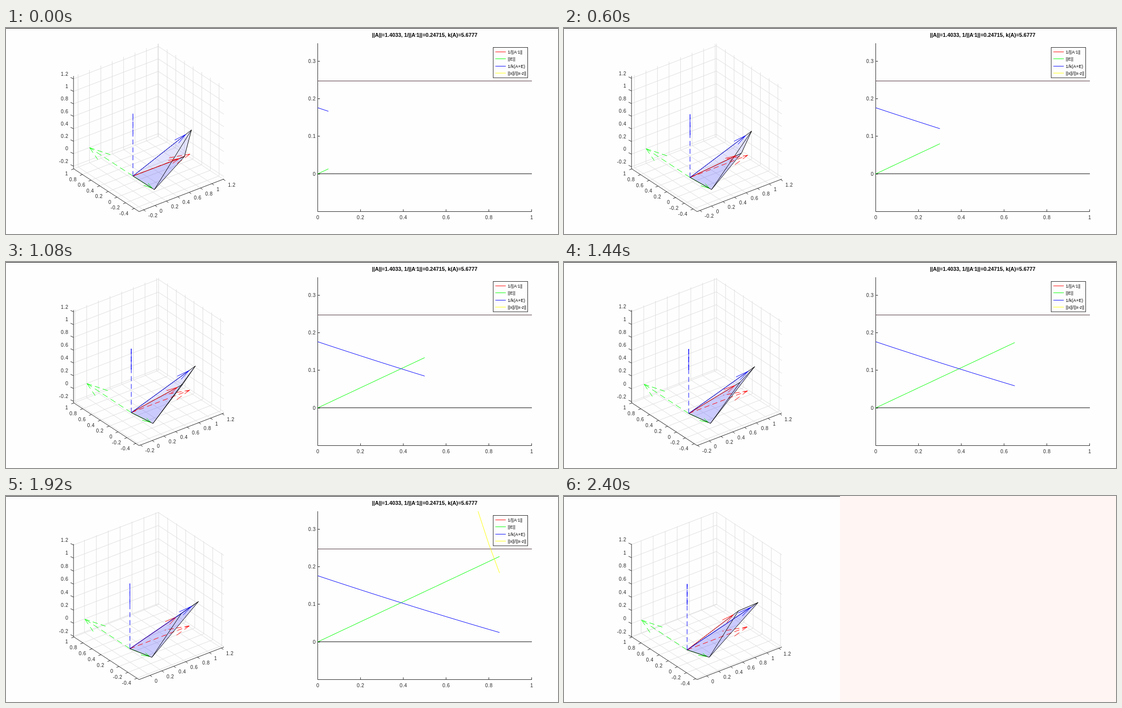
Write an HTML page that moves like this. It is 1120x418 px and loops after 2520 ms.

```html
<!DOCTYPE html>
<html lang="en">
<head>
<meta charset="utf-8">
<title>Matrix perturbation</title>
<style>
html, body { margin: 0; width: 100%; height: 100%; overflow: hidden; background: #fefefe; }
svg { display: block; width: 1120px; height: 418px; }
text { font-family: "Liberation Sans", Arial, sans-serif; fill: #262626; }
.tick text { font-size: 10px; letter-spacing: .45px; }
.key text { font-size: 9px; fill: #000; }
.title { font-size: 10.8px; font-weight: bold; fill: #000; }
path, line { fill: none; stroke-width: 1; }
</style>
</head>
<body>
<svg viewBox="0 0 1120 418">
  <defs><clipPath id="plot"><rect x="632" y="31" width="435" height="341"/></clipPath></defs>
  <rect width="1120" height="418" fill="#fefefe"/>
  <g id="space"></g>
  <g id="chart">
    <g id="axes" class="tick"></g>
    <g id="curves" clip-path="url(#plot)"></g>
    <g id="key" class="key"></g>
    <text class="title" x="849.5" y="18" text-anchor="middle">||A||=1.4033, 1/||A<tspan dy="-4" font-size="7">-</tspan><tspan dy="4">1||=0.24715, k(A)=5.6777</tspan></text>
  </g>
  <rect id="blank" x="560" width="560" height="418" fill="#fff5f3"/>
  <rect id="rule" width="1120" height="1" fill="#000"/>
</svg>
<script>
const STEP = 120, COUNT = 21;
const INK = '#262626', GRID = '#dedede';
const RED = '#f00', GREEN = '#0f0', BLUE = '#00f', YELLOW = '#ff0';
const $ = id => document.getElementById(id);
const n = v => +v.toFixed(2);
const mix = (a, b, u) => a + (b - a) * u;
const add = (p, q, s = 1) => [p[0] + q[0] * s, p[1] + q[1] * s];
const sub = (p, q) => add(p, q, -1);

const poly = pts => 'M' + pts.map(p => n(p[0]) + ' ' + n(p[1])).join('L');
const stroke = (pts, color, extra = '') => `<path d="${poly(pts)}" stroke="${color}" ${extra}/>`;
const label = (x, y, s, anchor) =>
  `<text x="${n(x)}" y="${n(y + 3.6)}" text-anchor="${anchor}">${s}</text>`;

// Dash lengths are counted along the longer screen axis
function dashed(a, b, color) {
  const d = sub(b, a);
  const k = Math.hypot(...d) / Math.max(Math.abs(d[0]), Math.abs(d[1]), 1);
  return stroke([a, b], color, `stroke-dasharray="${n(10 * k)} ${n(6 * k)}"`);
}

function ticks(lo, hi) {
  const out = [];
  for (let i = Math.ceil(lo * 5 - 1e-6); i <= hi * 5 + 1e-6; i++) out.push(i / 5);
  return out;
}

// Box of the 3D axes: front corner and its three edges
const FRONT = [270, 372.5], EDGES = [[172, -66], [-133, -87], [0, -188]];
// Lower limit and span of x, y, z at the first and last step
const LIMITS = [
  [[-.28, 1.489], [-.16, 1.41]],
  [[-.51, 1.515], [-.43, 1.44]],
  [[-.241, 1.487], [-.2001, 1.407]]
];
// Column tips on screen at the first and last step
const TIPS = {
  r: [[362, 261], [354, 233]],
  g: [[301, 328], [294.8, 327.2]],
  b: [[376.3, 206.8], [394, 216]]
};

function drawSpace(u) {
  const lim = LIMITS.map(([a, b]) => {
    const lo = mix(a[0], b[0], u);
    return [lo, lo + mix(a[1], b[1], u)];
  });
  const unit = EDGES.map((e, i) => e.map(c => c / (lim[i][1] - lim[i][0])));
  const at = (...c) => c.reduce((p, v, i) => add(p, unit[i], v - lim[i][0]), FRONT);
  const [[x0, x1], [y0, y1], [z0, z1]] = lim;
  let grid = '', marks = '', names = '';

  for (const x of ticks(x0, x1)) {
    grid += stroke([at(x, y0, z0), at(x, y1, z0), at(x, y1, z1)], GRID);
    const p = at(x, y0, z0);
    marks += stroke([p, add(p, [4, 3])], INK);
    names += label(p[0] + 9.5, p[1] + 11.3, x, 'start');
  }
  for (const y of ticks(y0, y1)) {
    grid += stroke([at(x0, y, z0), at(x1, y, z0), at(x1, y, z1)], GRID);
    const p = at(x0, y, z0);
    marks += stroke([p, add(p, [-5, 2])], INK);
    names += label(p[0] - 11.5, p[1] + 9.8, y, 'end');
  }
  for (const z of ticks(z0, z1)) {
    grid += stroke([at(x0, y1, z), at(x1, y1, z), at(x1, y0, z)], GRID);
    const p = at(x0, y1, z);
    marks += stroke([p, add(p, [-6, -3])], INK);
    names += label(126.5, p[1] - 10.2, z, 'end');
  }
  const frame = stroke([at(x0, y1, z1), at(x0, y1, z0), at(x0, y0, z0), at(x1, y0, z0)], INK);

  const o = at(0, 0, 0);
  const tip = k => [0, 1].map(i => mix(TIPS[k][0][i], TIPS[k][1][i], u));
  const r = tip('r'), g = tip('g'), b = tip('b');

  const face = (...pts) => `<path d="${poly(pts)}Z" style="fill:#00f" fill-opacity=".105"/>`;
  const solid = face(o, g, b) + face(o, g, r) + face(g, r, b);
  const edges = [[o, r], [o, g], [o, b], [r, g], [g, b], [b, r]]
    .map(e => stroke(e, '#000')).join('');

  function arrow(end, color, head, side) {
    const d = sub(end, o), t = add(o, d, .9), m = add(t, d, -.9 * head);
    return stroke([o, t], color) + stroke([add(m, side), t, add(m, side, -1)], color);
  }
  function basis(axis, across, color) {
    const d = unit[axis], t = add(o, d), m = add(t, d, -.33);
    const w = across === null ? [0, 0] : unit[across];
    return dashed(o, t, color) + dashed(t, add(m, w, .11), color) +
      dashed(t, add(m, w, -.11), color);
  }

  $('space').innerHTML = grid + frame + marks + `<g class="tick">${names}</g>` + solid +
    basis(0, 1, RED) + basis(1, 0, GREEN) + basis(2, null, BLUE) +
    arrow(g, GREEN, .33, [4.5, -2]) + edges +
    arrow(r, RED, .19, [-4.4, -2.9]) + arrow(b, BLUE, .17, [-4, -3.1]);
}

// Chart
const px = x => 632.5 + 434 * x;
const py = y => 296 - 762 * y;

function drawAxes() {
  let s = stroke([[632.5, 31], [632.5, 372.5], [1067, 372.5]], INK);
  for (const x of ticks(0, 1)) {
    s += stroke([[px(x), 372.5], [px(x), 368]], INK) + label(px(x) + .2, 384.7, x, 'middle');
  }
  for (const y of [0, .1, .2, .3]) {
    const v = Math.floor(py(y)) + .5;
    s += stroke([[632.5, v], [637, v]], INK) + label(628.5, py(y), y, 'end');
  }
  $('axes').innerHTML = s;

  const rows = [
    [RED, '1/||A<tspan dy="-3" font-size="6">-</tspan><tspan dy="3">1||</tspan>'],
    [GREEN, '||E||'], [BLUE, '1/k(A+E)'], [YELLOW, '||x||/||x-z||']
  ];
  $('key').innerHTML =
    `<rect x="988.5" y="39.5" width="70" height="61.5" fill="#fefefe" stroke="${INK}"/>` +
    rows.map(([color, name], i) => {
      const y = 48.5 + Math.round(i * 14.3);
      return stroke([[993, y], [1014, y]], color) + label(1018, y - .3, name, 'start');
    }).join('');
}

const curves = [
  [GREEN, 0, x => .2676 * x],
  [BLUE, 0, x => Math.abs(.1761 - .19 * x + .0143 * x * x)],
  [YELLOW, .7, x => 1.04 * (1 - x) / x]
];

function drawCurves(end) {
  let s = stroke([[632, 107.5], [1067, 107.5]], '#4d3038') +
    stroke([[632, 295.8], [1067, 295.8]], '#000');
  for (const [color, from, f] of curves) {
    const pts = [];
    for (let x = from; x < end + .001; x += .05) pts.push([px(x), py(f(x))]);
    if (pts.length > 1) s += stroke(pts, color);
  }
  $('curves').innerHTML = s;
}

let shown = -1;
function draw(ms) {
  const k = Math.floor(ms / STEP) % COUNT;
  if (k === shown) return;
  shown = k;
  const last = k === COUNT - 1;
  drawSpace(k / (COUNT - 1));
  drawCurves(Math.min(1, (k + 1) * .05));
  $('blank').style.display = last ? '' : 'none';
  $('rule').setAttribute('width', last ? 560 : 1120);
}

drawAxes();
draw(0);
const start = performance.now();
(function loop() {
  draw(performance.now() - start);
  requestAnimationFrame(loop);
})();
</script>
</body>
</html>
```
